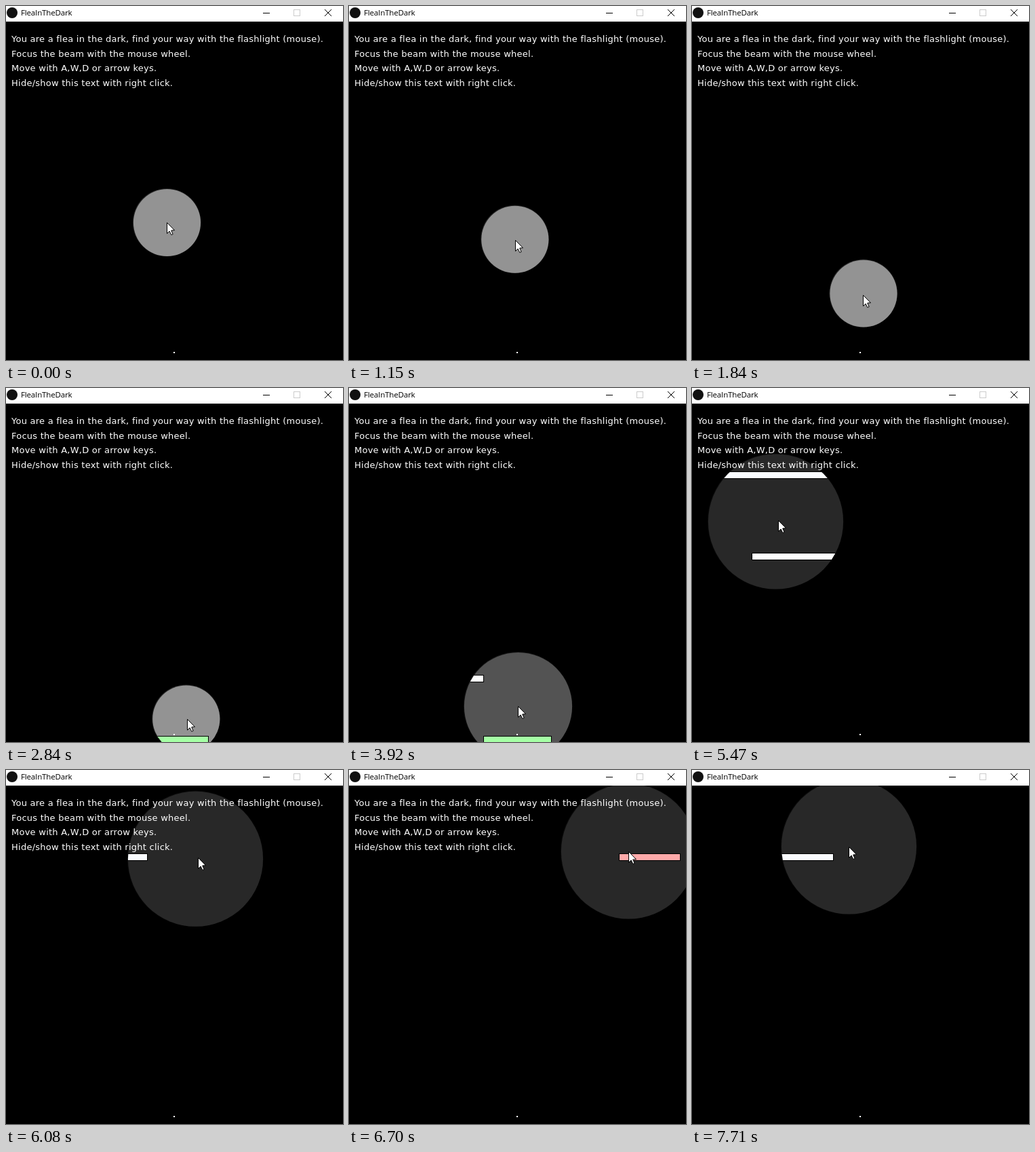
Recreate the animation shown at these times as an HTML page with a canvas. Size 497x522 px, loop 8 s.

```html
<!DOCTYPE html>
<html>
<head>
<meta charset="utf-8">
<style>
html, body { margin: 0; width: 497px; height: 522px; overflow: hidden; background: #000 }
canvas { display: block }
</style>
</head>
<body>
<canvas id="stage" width="497" height="522"></canvas>
<script>
const ctx = document.getElementById('stage').getContext('2d');
const LOOP = 8000, MOVE_START = 988, TICK = 77.15, HIDE_TEXT_TICK = 83;

// Turning points of the pointer: tick, x, y
const path = [
  [-1, 237.5, 319.5], [9, 262, 402], [11, 253, 424], [14, 242, 465],
  [21, 246, 488], [26, 279, 488], [28, 279, 488], [38, 249.5, 469.5],
  [46, 242.5, 468], [48, 181.5, 452], [52, 125, 400], [56, 104, 248],
  [58, 123.5, 197], [67, 299, 123], [74, 412.5, 120], [79, 412.5, 120],
  [87, 231.5, 113]
];

// Grid coordinates of the room: x, y, width, colour
const platforms = [
  [200, 490, 100, '#a5ffa5'], [100, 400, 100, '#fff'], [90, 220, 200, '#fff'],
  [10, 100, 200, '#fafcff'], [400, 100, 90, '#ffaaaa']
];
const help = [
  'You are a flea in the dark, find your way with the flashlight (mouse).',
  'Focus the beam with the mouse wheel.',
  'Move with A,W,D or arrow keys.',
  'Hide/show this text with right click.'
];

const clamp = (v, lo, hi) => Math.min(Math.max(v, lo), hi);

function position(tick) {
  const at = clamp(tick, path[0][0], path[path.length - 1][0]);
  const i = path.findIndex(p => p[0] >= at) || 1;
  const [t0, x0, y0] = path[i - 1], [t1, x1, y1] = path[i];
  const k = (at - t0) / (t1 - t0);
  return [x0 + (x1 - x0) * k, y0 + (y1 - y0) * k];
}

// One wheel notch every three ticks
const beamRadius = tick => 50 + 10 * clamp(Math.floor((tick - 28) / 3), 0, 5);

function rect(x, y, w, h, color) {
  ctx.fillStyle = color;
  ctx.fillRect(x, y, w, h);
}

function disc(x, y, r, color) {
  ctx.beginPath();
  ctx.arc(x, y, r, 0, 2 * Math.PI);
  ctx.fillStyle = color;
  ctx.fill();
}

function line(color, ...points) {
  ctx.beginPath();
  points.forEach(([x, y]) => ctx.lineTo(x, y));
  ctx.strokeStyle = color;
  ctx.stroke();
}

function text(str, x, y, font, spacing, color) {
  ctx.font = font;
  ctx.letterSpacing = spacing + 'px';
  ctx.fillStyle = color;
  ctx.fillText(str, x, y);
}

function drawBeam(x, y, r) {
  const gray = v => `rgb(${v},${v},${v})`;
  const level = Math.round(254 - 2.14 * r); // a wider beam is dimmer
  disc(x - .4, y - .4, r + .2, gray(level >> 2));
  ctx.save();
  disc(x, y, r - .4, gray(level));
  ctx.clip();
  for (const [px, py, w, color] of platforms) {
    rect(px - 2, py + 23, w + 1, 11, '#000');
    rect(px - 1, py + 24, w - 1, 9, color);
  }
  ctx.restore();
}

function drawTitleBar() {
  rect(0, 0, 497, 23, '#fff');
  disc(9, 10, 8, '#111');
  text('FleaInTheDark', 22, 14, '11.5px "Open Sans", sans-serif', -.15, '#000');
  rect(379, 10, 10, 1, '#000');
  ctx.strokeStyle = '#ccc';
  ctx.strokeRect(424.5, 5.5, 9, 9);
  line('#000', [470, 5], [480, 15]);
  line('#000', [480, 5], [470, 15]);
}

function drawHelp() {
  help.forEach((str, i) =>
    text(str, 8, Math.round(53 + 21.6 * i), '13px "DejaVu Sans", sans-serif', .25, '#fff'));
}

function drawCursor(x, y) {
  ctx.save();
  ctx.translate(Math.floor(x) + .5, Math.floor(y) + .5);
  ctx.beginPath();
  [[0, 0], [0, 16], [3.6, 12.5], [6.3, 18], [8.6, 17], [6.2, 11.5], [11, 11.2]]
    .forEach(([px, py]) => ctx.lineTo(px, py));
  ctx.closePath();
  ctx.fillStyle = '#fff';
  ctx.fill();
  ctx.strokeStyle = '#000';
  ctx.stroke();
  ctx.restore();
}

function draw(time) {
  const tick = Math.floor((time % LOOP - MOVE_START) / TICK);
  rect(0, 0, 497, 522, '#000');
  drawBeam(...position(tick), beamRadius(tick));
  rect(247, 510, 2, 2, '#fff');
  drawTitleBar();
  if (tick < HIDE_TEXT_TICK) drawHelp();
  drawCursor(...position(tick + .2)); // the beam trails the pointer slightly
}

const start = performance.now();
function frame() {
  draw(performance.now() - start);
  requestAnimationFrame(frame);
}
frame();
</script>
</body>
</html>
```
